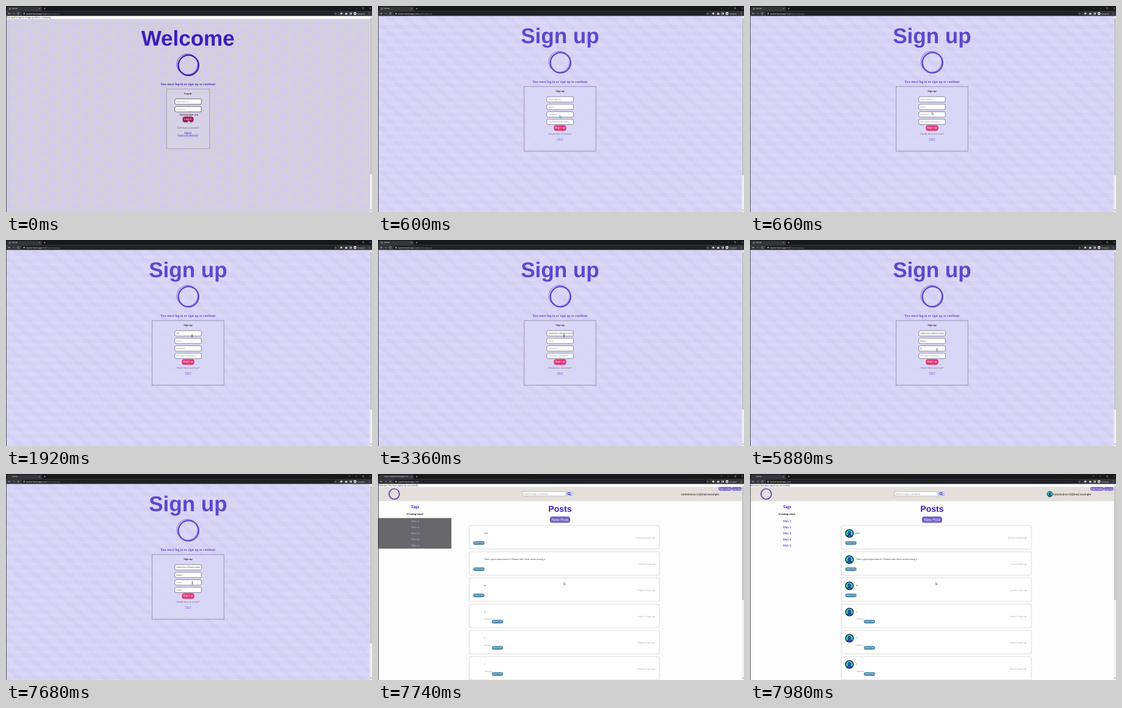
These frames come from a looping animation (600x338 px, 8 s). An HTML page:

```html
<!DOCTYPE html>
<html lang="en">
<head>
<meta charset="utf-8">
<title>Sign up flow</title>
<style>
html, body { margin: 0; width: 100%; height: 100%; overflow: hidden; background: #fff; }
svg { display: block; width: 100%; height: 100%; }
text { white-space: pre; text-rendering: geometricPrecision; }
.sans { font-family: "Liberation Sans", Arial, sans-serif; }
.serif { font-family: "Liberation Serif", "Times New Roman", serif; }
.ui { font-family: Roboto, sans-serif; }
.bold { font-weight: 700; }
.link { text-decoration: underline; text-decoration-thickness: .35px; }
</style>
</head>
<body>
<svg id="stage" viewBox="0 0 600 338" preserveAspectRatio="none"></svg>
<script>
const LOOP = 8000, STEP = 60;
const EMAIL = "rubenkolva+2@mail.example", NAME = "Ruben", SITE = "Murbit";
const HOST = "tweetit.herokuapp.com";
const INDIGO = "#3a1ebb", VIOLET = "#5b48ce";

// Markup helpers
const rect = (x, y, w, h, fill, more = "") =>
  `<rect x="${x}" y="${y}" width="${w}" height="${h}" fill="${fill}" ${more}/>`;
const text = (x, y, size, str, fill, cls = "serif", anchor = "start", more = "") =>
  `<text x="${x}" y="${y}" font-size="${size}" fill="${fill}" class="${cls}" text-anchor="${anchor}" ${more}>${str}</text>`;
const mid = (x, y, size, str, fill, cls) => text(x, y, size, str, fill, cls, "middle");
const circle = (x, y, r, fill, more = "") =>
  `<circle cx="${x}" cy="${y}" r="${r}" fill="${fill}" ${more}/>`;
const line = (d, color, w = 0.6) =>
  `<path d="${d}" fill="none" stroke="${color}" stroke-width="${w}"/>`;
const poly = (points, fill, more = "") => `<polygon points="${points}" fill="${fill}" ${more}/>`;
const group = (id, body) => `<g id="${id}">${body}</g>`;

const ring = (x, y, r, color) =>
  circle(x, y, r, "none", `stroke="${color}" stroke-width="${r * 0.14}"`) +
  circle(x - r * 0.12, y - r * 0.09, r * 1.03, "none", `stroke="${color}" stroke-width="${r * 0.045}"`);

const button = (x, y, w, h, fill, size, label, shadow = "none") =>
  rect(x, y + 1, w, h, shadow, `rx="${h * 0.42}"`) +
  rect(x, y, w, h, fill, `rx="${h * 0.42}"`) +
  mid(x + w / 2, y + h / 2 + size * 0.32, size, label, "#fff", "sans");

const field = (y, hint, id = "", edge = "#55536a") =>
  rect(276.8, y, 43.8, 8.8, "#fff", `rx="2.4" stroke="${edge}" stroke-width=".65"`) +
  text(279.2, y + 5.5, 3.2, hint, "#85858c", "sans", "start", `${id && `id="${id}"`} clip-path="url(#fieldClip)"`);

const avatar = (x, y, r) =>
  circle(x, y, r, "#31d6c4", `stroke="#111a2c" stroke-width="${r * 0.2}"`) +
  circle(x, y - r * 0.18, r * 0.36, "#2b4fd0", `stroke="#14204a" stroke-width="${r * 0.1}"`) +
  `<path d="M${x - r * 0.55} ${y + r * 0.72}a${r * 0.55} ${r * 0.55} 0 0 1 ${r * 1.1} 0z" fill="#2b4fd0" stroke="#14204a" stroke-width="${r * 0.1}"/>`;

const scrollbar = (top, end) =>
  rect(596.6, 16.4, 3.4, 322, "#f1f1f1") + rect(597, top, 2.7, end - top, "#c1c1c1") +
  poly("597.3,334.5 599.5,334.5 598.4,336", "#666");

function cube(x, y) {
  return `<g transform="translate(${x} ${y})">` +
    poly("14,0 28,4 14,8 0,4", "#dad8f8") + poly("0,4 14,8 14,16 0,12", "#d3d0f4") + "</g>";
}

// Triangle grid with vertical edges: one lilac and one grey triangle
function tri(x, y) {
  return poly(`${x},${y} ${x + 18},${y + 10} ${x},${y + 20}`, "#d2ccea") +
    poly(`${x},${y} ${x + 18},${y - 10} ${x + 18},${y + 10}`, "#d3d0dc");
}

function defs() {
  const cubes = [[0, 0], [-14, 12], [14, 12], [-14, -12], [14, -12]].map(p => cube(...p)).join("");
  const tris = [[0, 0], [0, 20], [18, -10], [18, 10]].map(p => tri(...p)).join("");
  return `<defs>
    <pattern id="cubes" width="28" height="24" patternUnits="userSpaceOnUse">${rect(0, 0, 28, 24, "#d7d4f6")}${cubes}</pattern>
    <pattern id="tris" width="36" height="20" patternUnits="userSpaceOnUse">${rect(0, 0, 36, 20, "#d6d2e3")}${tris}</pattern>
    <pattern id="check" width="2" height="2" patternUnits="userSpaceOnUse">${rect(0, 0, 2, 2, "#79797c")}${rect(0, 0, 1, 1, "#555558")}${rect(1, 1, 1, 1, "#555558")}</pattern>
    <clipPath id="fieldClip">${rect(278, 140, 40.4, 60, "#fff")}</clipPath>
  </defs>`;
}

function browser() {
  const ink = "#d6d7da";
  return rect(0, 0, 600, 8.5, "#17181a") +
    `<path d="M1.5 8.5V2.8q0-1.5 1.5-1.5H57q1.5 0 1.5 1.5V8.5z" fill="#35363a"/>` +
    rect(0, 8, 600, 8.4, "#35363a") + rect(0, 16, 0.8, 322, "#2a2a30") +
    group("favicon", circle(6.4, 4.4, 1.3, "none", `stroke="${ink}" stroke-width=".5"`)) +
    text(10.6, 5.2, 2.9, SITE, "#eee", "ui", "start", 'id="tab"') +
    line("M54 3.4l1.8 1.8m0-1.8l-1.8 1.8M62 4.3h3m-1.5-1.5v3", ink, 0.45) +
    line("M562 3l1.2 1.2 1.2-1.2M573 3.9h2.4M584.5 2.7h2v2h-2zM596 2.7l2 2m0-2l-2 2", ink, 0.4) +
    line("M7.2 12.4H4m1.4-1.4L4 12.4l1.4 1.4", ink) +
    line("M11 12.4h3.2m-1.4-1.4l1.4 1.4-1.4 1.4", "#85878b") +
    group("reload", line("M21.4 11.3a1.6 1.6 0 1 0 .3 1.7M21.7 10.4v1.2h-1.2", ink, 0.55)) +
    group("stop", line("M18.8 11l2.8 2.8m0-2.8l-2.8 2.8", ink)) +
    rect(25.5, 9.3, 519, 6.2, "#202124", 'rx="3.1"') +
    rect(28.7, 12, 1.9, 1.6, ink) + line("M29 12v-.6a.65.65 0 0 1 1.3 0v.6", ink, 0.35) +
    `<text x="32.8" y="13.6" font-size="3.3" class="ui" fill="#eee">${HOST}<tspan id="path" fill="#8d9095"></tspan></text>` +
    line("M540.5 10.8l.6 1.1 1.2.2-.9.9.2 1.2-1.1-.6-1.1.6.2-1.2-.9-.9 1.2-.2z", ink, 0.4) +
    rect(548, 11, 3.4, 2.8, ink, 'rx=".8"') +
    `<path d="M556 11.4h1a.8.8 0 0 1 1.5 0h1v2.8h-3.5z" fill="${ink}"/>` +
    rect(563.3, 11, 3.2, 3, "none", `stroke="${ink}" stroke-width=".5"`) + rect(564.9, 11, 1.6, 3, ink) +
    circle(572.2, 12.4, 2.3, "#eee") + rect(570.9, 12, 2.6, 0.9, "#35363a") +
    text(576.5, 13.5, 2.8, "Incognito", "#eee", "ui") +
    [10.8, 12.4, 14].map(y => circle(595.6, y, 0.45, ink)).join("");
}

function loginPage() {
  return rect(0, 16, 600, 322, "#fff") + rect(0, 21.2, 600, 317, "url(#tris)") +
    text(0.8, 20, 3.75, "You need to sign in or sign up before continuing.", "#222") +
    mid(298.2, 65.2, 35, "Welcome", INDIGO, "sans bold") +
    ring(299.2, 97.2, 16.6, INDIGO) +
    mid(298.4, 130, 5.6, "You must log in or sign up to continue", "#482fc4", "serif bold") +
    rect(263.3, 136.3, 70.4, 97.6, "#d8d4e6", 'fill-opacity=".8" stroke="#555262" stroke-width=".6" stroke-dasharray="1 .6"') +
    mid(298.4, 144.6, 4.4, "Log in", "#1b1a20", "serif bold") +
    field(152.4, "Email address", "", "#2a2933") + field(165, "Password", "", "#2a2933") +
    mid(300, 180, 4.6, "Remember me", "#222", "sans") +
    button(289.6, 181.4, 17.8, 8.8, "#ab1056", 4.8, "Log in", "#8b6f84") +
    mid(298.4, 200.6, 3.75, "Don't have an account?", "#333") +
    mid(298.4, 208.6, 3.75, "Sign up", "#2a1fd6", "serif link") +
    mid(298.4, 212.8, 3.75, "Forgot your password?", "#2a1fd6", "serif link") +
    scrollbar(20, 276);
}

function signupPage() {
  return rect(0, 16, 600, 322, "url(#cubes)") +
    mid(298.4, 61, 35, "Sign up", VIOLET, "sans bold") +
    ring(299.2, 93, 16.6, VIOLET) +
    mid(298.4, 126, 5.6, "You must log in or sign up to continue", VIOLET, "serif bold") +
    rect(239.6, 132.1, 117.6, 106, "#d9d7f7", 'fill-opacity=".9" stroke="#6b6980" stroke-width=".6"') +
    mid(298.5, 140.9, 4.4, "Sign up", "#2b2a38", "serif bold") +
    field(148.8, "", "email") + field(161.1, "", "name") +
    field(173.5, "", "pass") + field(185.8, "", "again") +
    group("dots", "") +
    rect(0, 0, 0.35, 4.4, "#111", 'id="caret"') +
    button(288.4, 195.6, 20.2, 8.6, "#f02f76", 4.8, "Sign up", "#a98ba9") +
    mid(298.4, 210.8, 3.75, "Already have an account?", "#555266") +
    mid(298.4, 219, 3.75, "Log in", "#4a34cc", "serif link") +
    scrollbar(20, 278);
}

function postsPage() {
  const posts = [
    ["post", "6 minutes"],
    ["Need a good replacement for Plumzer after Omar started ruining it", "7 days"],
    ["hi", "11 days"], ["a", "13 days", 1], ["f", "13 days", 1], ["f", "21 days", 1]
  ];
  const card = ([body, age, note], i) => {
    const y = 85 + 43 * i;
    return rect(149.4, y - 0.5, 312.2, 38.7, "none", 'rx="2.4" stroke="#eeeeef" stroke-width="1.6"') +
      rect(150.2, y, 310.6, 37.6, "#fff", 'rx="2" stroke="#d4d4d6" stroke-width=".5"') +
      text(174.2, y + 12.7, 3.75, body, "#222") +
      text(454.5, y + 20.6, 3.75, `Posted ${age} ago`, "#98989c", "serif", "end") +
      (note ? text(174.2, y + 25, 3.75, "olkfdsds", "#98989c") : "") +
      button(note ? 186.6 : 156.2, y + 25.3, 18.4, 5.9, "#4b88a9", 3.5, "View Post");
  };
  const tags = [1, 2, 3, 4, 5].map(n =>
    mid(60.6, 69.2 + 10 * n, 4.9, "TAG " + n, "currentColor", "serif bold")).join("");
  return rect(0, 16, 600, 322, "#fdfdfe") +
    text(0.8, 20, 3.75, "Welcome! You have signed up successfully.", "#222") +
    rect(0, 21.2, 597, 23.3, "#e3e0db") + ring(26.8, 33, 8.5, INDIGO) +
    rect(237, 29, 71, 7, "#fff", 'stroke="#8b8b90" stroke-width=".5"') +
    text(238.4, 33.6, 3.1, "Search for tags or usernames", "#77777c", "sans") +
    rect(308, 28.8, 11.6, 7.4, "#c8c8ee", 'rx="1"') +
    circle(313, 32, 1.9, "none", 'stroke="#2c2799" stroke-width=".9"') + line("M314.4 33.4l2 2", "#2c2799", 1) +
    button(558, 21.4, 21.8, 5.8, "#6c58c6", 4, "Edit Profile") +
    button(580, 21.4, 16.2, 5.8, "#6c58c6", 4, "Log Out") +
    text(497, 34.6, 4.8, EMAIL, "#111", "sans") +
    mid(60.6, 56.2, 7.1, "Tags", INDIGO, "serif bold") +
    mid(60.4, 67, 4.4, "(Coming soon)", "#111", "serif bold") +
    group("panel", rect(0, 72.3, 120.3, 50.2, "url(#check)")) +
    group("tags", tags) +
    mid(298.4, 62.4, 14, "Posts", INDIGO, "sans bold") +
    button(281.8, 69.8, 33.2, 9.8, "#745ec8", 6.1, "New Post", "#aaa7b4") +
    posts.map(card).join("") +
    group("avatars", avatar(491.6, 33, 4.5) + posts.map((p, i) => avatar(163, 97.5 + 43 * i, 6.4)).join("")) +
    scrollbar(20, 207);
}

function pointers() {
  return group("arrow", poly("0,0 0,4.3 1,3.4 1.7,5 2.4,4.7 1.7,3.1 3,3.1", "#fff", 'stroke="#222" stroke-width=".4"')) +
    group("hand", `<path d="M-.5 0q.5-.6 1 0v2l2 .6q.5.2.4.8l-.5 2h-2.6l-1.8-2 .5-.5 1 .6z" fill="#fff" stroke="#222" stroke-width=".35"/>`) +
    group("beam", line("M-.9-2.4q.9 0 .9.6v3.6q0 .6.9.6M.9-2.4q-.9 0-.9.6v3.6q0 .6-.9.6", "#222", 0.5));
}

const stage = document.getElementById("stage");
stage.innerHTML = defs() + group("login", loginPage()) + group("signup", signupPage()) +
  group("posts", postsPage()) + browser() + pointers();
const $ = id => document.getElementById(id);
const show = (id, on) => $(id).setAttribute("display", on ? "inline" : "none");

// Pointer stops: time, x, y
const STOPS = [
  [0, 299, 187], [240, 298, 206.5], [420, 298, 206.5], [660, 298, 174], [960, 305, 157],
  [3360, 305, 157], [3840, 306, 167], [5100, 306, 167], [5580, 306.5, 180], [7620, 306.5, 180], [7740, 304.4, 177.4]
];
function pointerAt(t) {
  const i = STOPS.findIndex(s => s[0] > t);
  if (i < 0) return STOPS[STOPS.length - 1].slice(1);
  const [a, x, y] = STOPS[i - 1], [b, x2, y2] = STOPS[i];
  const k = (t - a) / (b - a), e = k * k * (3 - 2 * k);
  return [x + (x2 - x) * e, y + (y2 - y) * e];
}

// Number of characters typed by time t, from bursts of [start, end, count]
const typed = (t, bursts) => bursts.reduce((n, [a, b, c]) =>
  n + (t < a ? 0 : Math.min(c, 1 + Math.floor((t - a) / (b - a) * (c - 1) + 1e-6))), 0);

const FIELDS = [
  { id: "email", y: 148.8, hint: "Email address", value: EMAIL, focus: 1060, bursts: [[1800, 2520, 10], [2700, 2760, 2], [3000, 3120, 13]] },
  { id: "name", y: 161.1, hint: "Name", value: NAME, focus: 3900, bursts: [[4260, 4860, 5]] },
  { id: "pass", y: 173.5, hint: "Password", secret: true, focus: 5600, bursts: [[5880, 6360, 8]] },
  { id: "again", y: 185.8, hint: "Password confirmation", secret: true, focus: 6600, bursts: [[6720, 7260, 8]] }
];

function drawForm(t) {
  const active = t < 7440 ? FIELDS.filter(f => t >= f.focus).pop() : null;
  let dots = "";
  show("caret", false);
  for (const f of FIELDS) {
    const n = typed(t, f.bursts), label = $(f.id);
    label.textContent = n ? (f.secret ? "" : f.value.slice(0, n)) : f.hint;
    label.setAttribute("fill", n ? "#3a3a42" : "#85858c");
    if (f.secret) for (let i = 0; i < n; i++) dots += circle(279.9 + i * 1.12, f.y + 4.4, 0.45, "#222");
    if (f !== active) continue;
    const last = Math.max(f.focus, ...f.bursts.flatMap(b => [b[0], b[1]]).filter(v => v <= t));
    const wide = n ? (f.secret ? n * 1.12 + 0.2 : label.getComputedTextLength()) : 0;
    $("caret").setAttribute("x", Math.min(279.2 + wide, 318.4));
    $("caret").setAttribute("y", f.y + 2.2);
    show("caret", (t - last) % 1000 < 500);
  }
  $("dots").innerHTML = dots;
}

function render(t) {
  const page = t < 420 ? "login" : t < 7740 ? "signup" : "posts";
  for (const p of ["login", "signup", "posts"]) show(p, p === page);
  if (page === "signup") drawForm(t);

  const ready = t >= 7860, busy = t >= 7440 && t < 7980;
  show("panel", !ready);
  show("avatars", ready);
  $("tags").setAttribute("color", ready ? "#3a28c4" : "#a3a9dc");
  show("stop", busy);
  show("reload", !busy);
  show("favicon", t < 7440);
  $("tab").textContent = t >= 7740 && !ready ? "https://" + HOST : SITE;
  $("path").textContent = { login: "/users/sign_in", signup: "/users/sign_up", posts: "" }[page];

  const [x, y] = pointerAt(t);
  const inField = page === "signup" && FIELDS.some(f => y >= f.y && y <= f.y + 8.8) && t > 840;
  const shape = page === "login" ? "hand" : inField ? "beam" : "arrow";
  for (const p of ["arrow", "hand", "beam"]) {
    show(p, p === shape);
    $(p).setAttribute("transform", `translate(${x} ${y})`);
  }
}

let start;
function tick(now) {
  start ??= now;
  render(Math.floor(((now - start) % LOOP) / STEP) * STEP);
  requestAnimationFrame(tick);
}
render(0);
requestAnimationFrame(tick);
</script>
</body>
</html>
```
